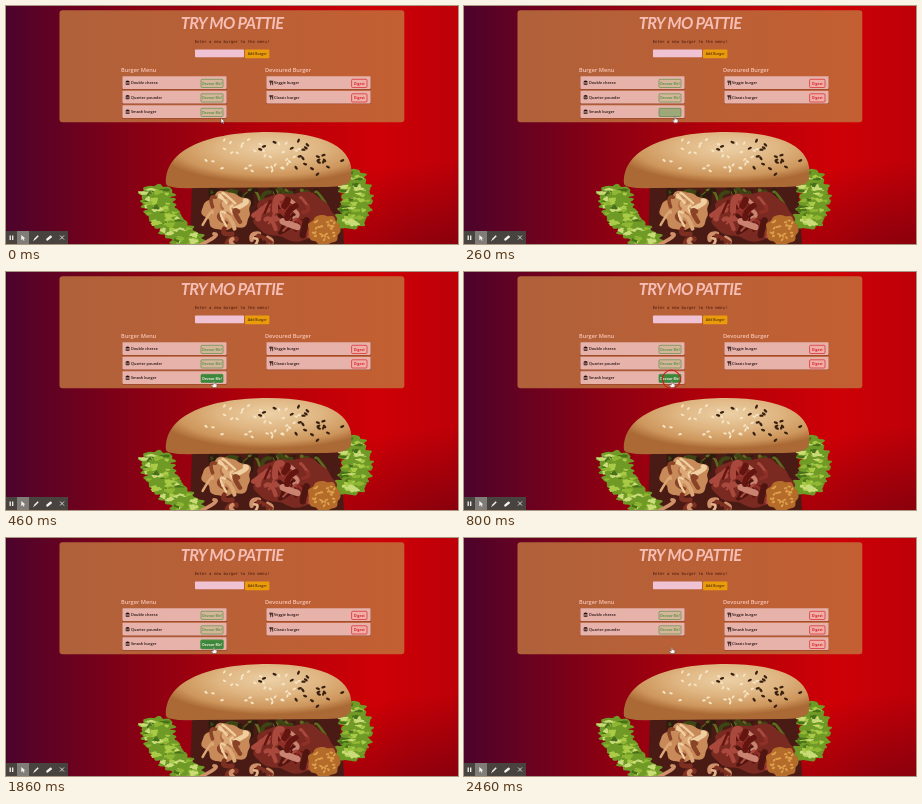
Write an HTML page that moves like this. It is 452 by 238 pixels and loops after 2.53 s.

```html
<!DOCTYPE html>
<html lang="en">
<head>
<meta charset="utf-8">
<title>Burger menu</title>
<style>
  html, body { margin: 0; width: 100%; height: 100%; overflow: hidden; background: #8a0010; }
  svg { display: block; width: 100vw; height: 100vh; }
  text { font-family: "Open Sans", sans-serif; }
  .title { font: italic 700 16.4px Lato, sans-serif; letter-spacing: -.7px; fill: #f6bdb5; }
  .lead { font: 400 4px "DejaVu Sans Mono", monospace; fill: #46180d; }
  .head { font-size: 5.6px; font-weight: 600; fill: #f8c6b8; }
  .name { font-size: 3.8px; font-weight: 600; fill: #23100f; }
  .label { font-size: 3.4px; font-weight: 700; text-anchor: middle; }
</style>
</head>
<body>
<svg viewBox="0 0 452 238" preserveAspectRatio="none">
  <defs>
    <linearGradient id="wall">
      <stop offset="0" stop-color="#4c032b"/><stop offset=".3" stop-color="#890013"/>
      <stop offset=".55" stop-color="#b2000a"/><stop offset=".82" stop-color="#ce0006"/>
      <stop offset="1" stop-color="#bd0008"/>
    </linearGradient>
    <radialGradient id="corner" cx="1" cy="1.1" r=".45">
      <stop offset="0" stop-color="#600010" stop-opacity=".7"/><stop offset="1" stop-color="#600010" stop-opacity="0"/>
    </radialGradient>
    <linearGradient id="panel">
      <stop offset="0" stop-color="#b0613a"/><stop offset="1" stop-color="#c35f32"/>
    </linearGradient>
    <radialGradient id="bun" cx=".56" cy=".28" r=".62">
      <stop offset="0" stop-color="#ecd0a6"/><stop offset=".45" stop-color="#dfb581"/>
      <stop offset=".8" stop-color="#cd965c"/><stop offset="1" stop-color="#ab6a35"/>
    </radialGradient>
    <g id="patty-icon" fill="#23100f">
      <path d="M0 1.7Q0 0 2.1 0T4.2 1.7Z"/><path d="M0 2.1h4.2v.6H0zM0 3.1h4.2q0 1.1-1 1.1H1Q0 4.2 0 3.1Z"/>
    </g>
    <g id="fork-icon" fill="none" stroke="#23100f" stroke-width=".7">
      <path d="M.3 0v1.6h1.6V0M1.1 0v4.6M3.2 4.6V.2q-.9 1-.7 2.5h.7"/>
    </g>
  </defs>
  <rect width="452" height="238" fill="url(#wall)"/>
  <rect width="452" height="238" fill="url(#corner)"/>
  <g id="burger"></g>

  <rect x="53.5" y="4.3" width="344.8" height="112" rx="3" fill="url(#panel)"/>
  <text class="title" x="226" y="23" text-anchor="middle">TRY MO PATTIE</text>
  <text class="lead" x="226" y="37.3" text-anchor="middle">Enter a new burger to the menu!</text>
  <rect x="189" y="43.5" width="49" height="7.8" rx=".8" fill="#efc3d4"/>
  <rect x="239" y="43.6" width="24.4" height="8.6" rx="1" fill="#e99b0c"/>
  <text class="label" x="251.2" y="49.2" fill="#6b4208">Add Burger</text>
  <text class="head" x="115" y="66.4">Burger Menu</text>
  <text class="head" x="259" y="66.4">Devoured Burger</text>
  <g id="rows"></g>

  <g id="click"><circle id="ring" cx="207.4" cy="107.2" r="9" fill="none" stroke="#c9231f" stroke-width="1.2"/></g>
  <g id="pointer" stroke="#3a2a2a" stroke-width=".4" fill="#fff" stroke-linejoin="round">
    <path id="arrow" d="M0 0V5.2L1.3 4.1 2.2 6 3 5.6 2.2 3.8H3.8Z"/>
    <path id="hand" d="M-.6.5Q0-.4.6.5V2.6L2.8 3.2Q3.3 3.4 3.1 4.4L2.6 6.6H-.8L-2.4 4.2Q-2.3 3.2-.6 4.2Z"/>
  </g>

  <g fill="none" stroke="#f2f2f2">
    <path d="M0 225h62v13H0z" fill="#48433f" stroke="none"/>
    <path d="M11 225h12v13H11z" fill="#807c78" stroke="none"/>
    <path d="M4.2 229.6v4.4M6.7 229.6v4.4" stroke-width="1.3"/>
    <path d="M15.3 229v5.2l1.4-1.2 1 1.8.8-.4-.9-1.8h1.8Z" fill="#f2f2f2" stroke="none"/>
    <path d="M28.2 233.8l4-4" stroke-width="1.5"/><path d="M27.2 234.9l1.2-.9" stroke-width=".7"/>
    <path d="M41.4 233.4l3.3-2.7" stroke-width="2.4" stroke-linecap="round"/>
    <path d="M54 229.5l4 4M58 229.5l-4 4" stroke-width=".8"/>
  </g>
</svg>
<script>
const $ = id => document.getElementById(id);

function add(parent, tag, attrs, text) {
  const el = document.createElementNS("http://www.w3.org/2000/svg", tag);
  for (const key in attrs) el.setAttribute(key, attrs[key]);
  if (text) el.textContent = text;
  return parent.appendChild(el);
}

let seed = 11;
const random = () => (seed = (seed * 16807) % 2147483647) / 2147483647;
const spread = size => (random() * 2 - 1) * size;
const pick = list => list[Math.floor(random() * list.length)];

/* ---- burger ---- */
const burger = $("burger");

// Closed shape around an ellipse with a wavy rim.
function blob(cx, cy, rx, ry, fill, depth = .1, waves = 7) {
  const phase = random() * 6, points = [];
  for (let a = 0; a < 2 * Math.PI; a += .12) {
    const r = 1 + depth * (Math.sin(waves * a + phase) + .6 * Math.sin((waves + 4) * a));
    points.push(`${(cx + rx * r * Math.cos(a)).toFixed(1)} ${(cy + ry * r * Math.sin(a)).toFixed(1)}`);
  }
  return add(burger, "path", { d: `M${points.join("L")}Z`, fill });
}

// Random point inside an ellipse.
function inside(cx, cy, rx, ry) {
  const angle = random() * 2 * Math.PI, reach = Math.sqrt(random());
  return [cx + rx * reach * Math.cos(angle), cy + ry * reach * Math.sin(angle)];
}

function leaf(cx, cy, rx, ry) {
  blob(cx, cy, rx, ry, "#6f9a26", .1, 8);
  for (let i = 0; i < 9; i++) {
    const [x, y] = inside(cx, cy, rx * .8, ry * .7);
    blob(x, y, 2 + random() * 4, 1 + random() * 2, pick(["#47701a", "#8fb733", "#a9cb48", "#c9dc78"]), .2, 3);
  }
}

function strips(count, area, colors, width) {
  for (let i = 0; i < count; i++) {
    const [x, y] = inside(...area);
    add(burger, "path", {
      d: `M${x} ${y}q${spread(12)} ${spread(7)} ${spread(14)} ${5 + random() * 10}`,
      fill: "none", stroke: pick(colors), "stroke-width": width * (.4 + random()), "stroke-linecap": "round"
    });
  }
}

function seeds(count, area, size, fill) {
  for (let i = 0; i < count; i++) {
    const [x, y] = inside(...area);
    add(burger, "ellipse", { cx: x, cy: y, rx: size, ry: size * .55, fill,
      transform: `rotate(${spread(70)} ${x} ${y})` });
  }
}

add(burger, "path", { d: "M186 180H334L338 238H184Z", fill: "#4a1a14" });
strips(26, [255, 186, 62, 4], ["#3c4513", "#5d6a1f", "#2f1a10"], 4);
for (let i = 0; i < 6; i++) leaf(151 + 1.2 * i * i, 188 + 9 * i, 17, 9);
for (let i = 0; i < 5; i++) leaf(344 + 7 * Math.sin(i * Math.PI / 4), 172 + 10.5 * i, 16, 9);

blob(221, 205, 24, 19, "#c98a5a", .08, 5);
strips(16, [220, 198, 20, 12], ["#efcfa0", "#dba775", "#8a4326", "#b06a42"], 3.5);
blob(288, 210, 40, 24, "#7a2a20", .06, 5);
strips(30, [284, 204, 34, 16], ["#8f3028", "#a9483c", "#641510", "#c98370", "#4f1510"], 5);
blob(318, 224, 16, 15, "#b56c2a", .05);
seeds(24, [318, 224, 13, 12], 1.8, "#dda04c");
strips(9, [240, 228, 34, 7], ["#d0916a", "#e4b48a", "#7d3022"], 4);

add(burger, "path", { fill: "url(#bun)",
  d: "M160 178C158 142 205 126 262 126S350 142 345 172Q344 181 320 181L190 182Q162 183 160 178Z" });
seeds(34, [252, 148, 62, 18], 1.9, "#f6e4c3");
seeds(22, [293, 152, 46, 20], 2.2, "#38200f");

/* ---- menu rows ---- */
const GREEN = "#5d9148", RED = "#d8232b", PITCH = 14.5;

function row(x, index, name, devoured) {
  const y = 70.3 + PITCH * index, g = add($("rows"), "g");
  add(g, "rect", { x, y: y + .5, width: 105, height: 13, rx: 1, fill: "#99472d" });
  add(g, "rect", { x: x + .4, y, width: 104.2, height: 12.6, rx: .8, fill: "#e6b2aa" });
  add(g, "use", { href: devoured ? "#fork-icon" : "#patty-icon", x: x + 3.5, y: y + 4.3 });
  add(g, "text", { class: "name", x: x + (devoured ? 8 : 9), y: y + 7.9 }, name);
  const color = devoured ? RED : GREEN, left = x + (devoured ? 85.6 : 79), width = devoured ? 15.4 : 22;
  const button = add(g, "rect", { x: left, y: y + 3, width, height: 8.2, rx: 1,
    fill: devoured ? "#efafa7" : "#d5b69b", stroke: color, "stroke-width": .7 });
  const label = add(g, "text", { class: "label", x: left + width / 2, y: y + 8.4, fill: color },
    devoured ? "Digest" : "Devour Me!");
  return { g, button, label };
}
const [, , smash] = ["Double cheese", "Quarter pounder", "Smash burger"].map((name, i) => row(116, i, name));
const [, eaten, classic] = ["Veggie burger", "Smash burger", "Classic burger"].map((name, i) => row(260, i, name, true));

/* ---- timeline, in ms ---- */
const LOOP = 2530, ARRIVE = 455, HOVER = 195, CLICK = 800, FOCUS = 860, MOVED = 2460;

function tween(el, from, to, start, end = start, count = 1) {
  el.animate([
    { ...from, offset: 0 },
    { ...from, offset: start / LOOP, easing: `steps(${count})` },
    { ...to, offset: end / LOOP },
    { ...to, offset: 1 }
  ], { duration: LOOP, iterations: Infinity });
}
const at = (x, y) => ({ transform: `translate(${x}px, ${y}px)` });
const hidden = { opacity: 0 }, visible = { opacity: 1 };

tween($("pointer"), at(215, 112), at(207.7, 109), 0, ARRIVE, 7);
tween($("arrow"), visible, hidden, HOVER);
tween($("hand"), hidden, visible, HOVER);

tween(smash.button, { fill: "#d5b69b", stroke: GREEN }, { fill: "#3b873b", stroke: "#468c40" }, HOVER, HOVER + 195, 3);
tween(smash.label, { fill: GREEN }, { fill: "#f5eadc" }, HOVER, HOVER + 195, 3);
tween(smash.button, { strokeWidth: ".7px" }, { strokeWidth: "1.5px" }, FOCUS);

tween($("click"), hidden, visible, CLICK);
tween($("ring"), visible, hidden, CLICK, CLICK + 200, 3);

tween(smash.g, visible, hidden, MOVED);
tween(eaten.g, hidden, visible, MOVED);
tween(classic.g, at(0, -PITCH), at(0, 0), MOVED);
</script>
</body>
</html>
```
